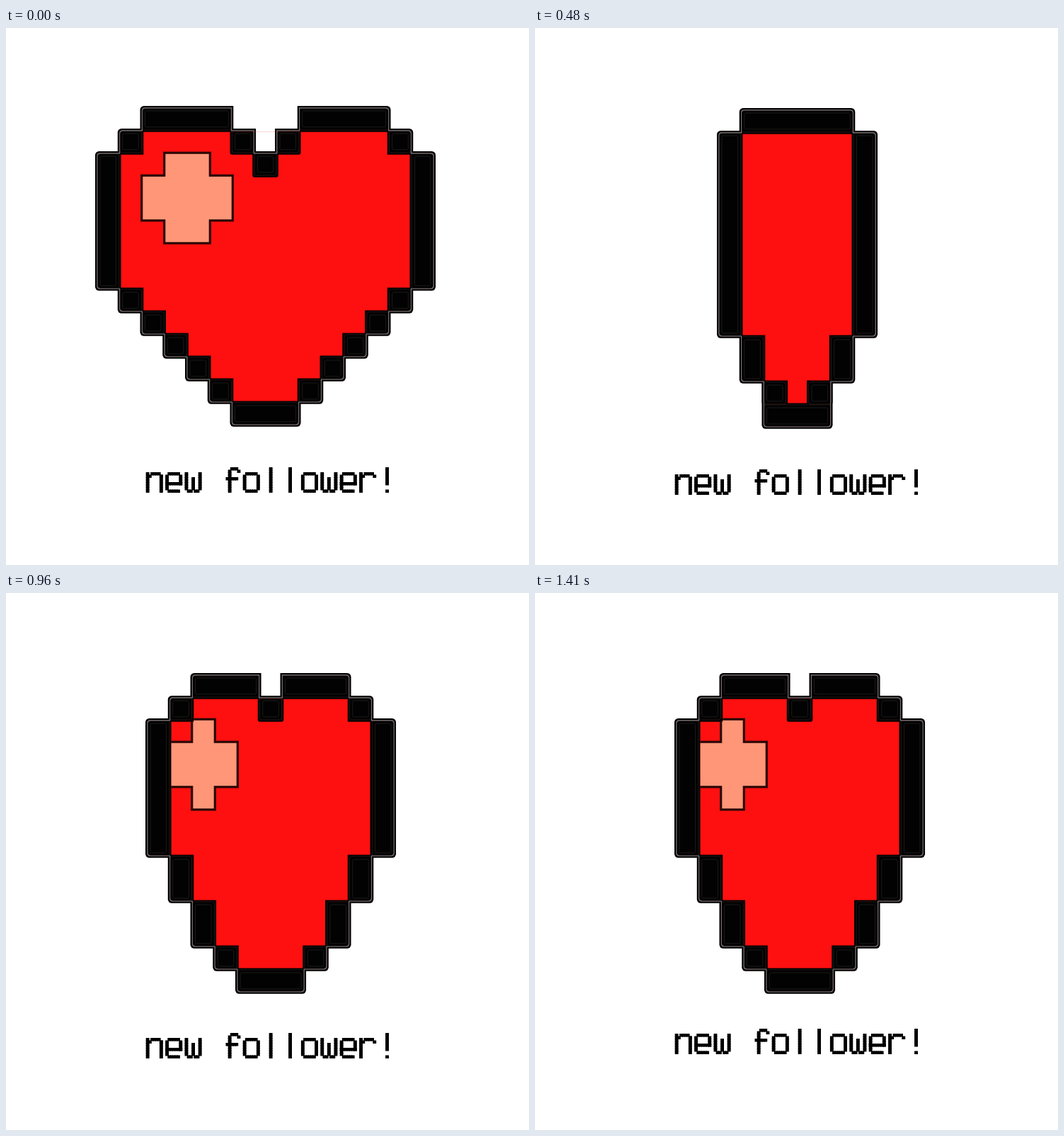
These frames come from a looping animation (739 px wide and 758 px high, 1.44 s). An HTML page with a canvas:

```html
<!DOCTYPE html>
<html lang="en">
<head>
<meta charset="utf-8">
<title>new follower!</title>
<style>
  html, body { margin: 0; width: 100%; height: 100%; overflow: hidden; background: #fff; }
  canvas { display: block; }
</style>
</head>
<body>
<canvas id="stage" width="739" height="758" role="img" aria-label="new follower!"></canvas>
<script>
const W = 739, H = 758, LOOP = 1440, TICK = 30, POSE_TIME = 120;
const PX = 31.75, PY = 32, LIP = 4.8; // cell pitch and overlap of neighbouring blocks
const BOTTOM_ROW = 13;
const ctx = document.getElementById('stage').getContext('2d');

// Builds the left half of a heart from cells; the right half is mirrored.
function makeHeart({ x, y, cols, shoulder, sideEnd, step, notch, patch }) {
  const mid = (cols - 1) / 2;
  const cell = (c, r, w = 1, h = 1) => ({ c, r, w, h });
  const lobe = notch ? mid - notch + 1 - shoulder : cols - 2 * shoulder;
  const rim = [cell(shoulder, 0, lobe), cell(0, shoulder, 1, sideEnd - shoulder),
               cell(mid - 1, BOTTOM_ROW, 3)];
  for (let i = 1; i < shoulder; i++) rim.push(cell(shoulder - i, i));
  for (let r = sideEnd, c = 1; r < BOTTOM_ROW; r += step, c++)
    rim.push(cell(c, r, 1, Math.min(step, BOTTOM_ROW - r)));

  const inner = [], gaps = [];
  for (let depth = notch; depth > 0; depth--) {
    const c = mid - depth + 1, r = notch - depth;
    gaps.push(cell(c, r, 2 * depth - 1));
    inner.push(cell(c, r + 1));
  }
  return { x, y, cols, rim, inner, gaps, patch };
}

const poses = [
  { x: 126, y: 110, cols: 15, shoulder: 2, sideEnd: 8, step: 1, notch: 2, patch: { x: 256, y: 240, arm: 32.5 } },
  { x: 257, y: 113, cols: 7, shoulder: 1, sideEnd: 10, step: 2, notch: 0 },
  { x: 197, y: 113, cols: 11, shoulder: 2, sideEnd: 8, step: 2, notch: 1, patch: { x: 279, y: 242, arm: 16.5 } }
];

function makeLayer(paint) {
  const layer = document.createElement('canvas');
  layer.width = W;
  layer.height = H;
  paint(layer.getContext('2d'));
  return layer;
}

function traceBox(g, [x, y, w, h], inset, radius) {
  g.beginPath();
  g.roundRect(x + inset, y + inset, w - 2 * inset, h - 2 * inset, radius);
}

function blockBox(heart, { c, r, w, h }) {
  return [heart.x + c * PX, heart.y + r * PY, w * PX + LIP, h * PY + LIP];
}

function gapBox(heart, { c, r, w, h }, grow) {
  return [heart.x + c * PX + LIP - grow, heart.y + r * PY - 6,
          w * PX - LIP + 2 * grow, h * PY + 6 + grow];
}

function bothSides(heart, blocks) {
  return blocks.flatMap(b => {
    const c = heart.cols - b.c - b.w;
    return c === b.c ? [b] : [b, { ...b, c }];
  });
}

function silhouette(heart, inset, color) {
  return makeLayer(g => {
    g.fillStyle = color;
    for (const { c, r, h } of heart.rim) {
      // Reach into the middle rows so that stacked spans merge.
      const top = Math.min(r, 5), bottom = Math.max(r + h, 6);
      const span = { c, r: top, w: heart.cols - 2 * c, h: bottom - top };
      traceBox(g, blockBox(heart, span), inset, 5.5 - inset / 2);
      g.fill();
    }
    g.globalCompositeOperation = 'destination-out';
    for (const gap of heart.gaps) g.fillRect(...gapBox(heart, gap, inset));
  });
}

function drawPatch(g, { x, y, arm }) {
  const reach = 32, armY = 32;
  const plus = grow => {
    g.fillRect(x - arm - grow, y - armY - reach - grow, 2 * (arm + grow), 2 * (armY + reach + grow));
    g.fillRect(x - arm - reach - grow, y - armY - grow, 2 * (arm + reach + grow), 2 * (armY + grow));
  };
  g.fillStyle = '#2b0806';
  plus(1.4);
  g.fillStyle = '#ff9678';
  plus(-1.8);
}

function redBody(heart) {
  return makeLayer(g => {
    g.beginPath();
    for (const { c, r, w, h } of heart.rim) {
      const left = (c + w) * PX + LIP, right = (heart.cols - c - w) * PX;
      if (r === 0 || right <= left) continue;
      const top = r * PY + (r < 3 ? LIP : 0);
      const bottom = (r + h) * PY + (r + h < 3 ? LIP + 1 : 0.5);
      g.rect(heart.x + left, heart.y + top, right - left, bottom - top);
    }
    g.fillStyle = '#ff1010';
    g.fill();
    g.clip();
    if (heart.patch) drawPatch(g, heart.patch);
    g.globalCompositeOperation = 'destination-out';
    for (const block of bothSides(heart, heart.inner)) {
      traceBox(g, blockBox(heart, block), 0, 3);
      g.fill();
    }
    for (const gap of heart.gaps) g.fillRect(...gapBox(heart, gap, 0));
  });
}

function renderHeart(heart) {
  return makeLayer(g => {
    g.drawImage(silhouette(heart, 0, '#000'), 0, 0);
    g.drawImage(silhouette(heart, 2.3, '#858585'), 0, 0);
    g.drawImage(silhouette(heart, 3.4, '#020202'), 0, 0);
    g.filter = 'blur(0.6px)';
    g.drawImage(redBody(heart), 0, 0);
    g.lineWidth = 1;
    for (const block of bothSides(heart, [...heart.rim, ...heart.inner])) {
      const box = blockBox(heart, block);
      g.strokeStyle = 'rgba(120,70,70,.3)';
      traceBox(g, box, 2.8, 3);
      g.stroke();
      g.strokeStyle = '#1b1b1b';
      traceBox(g, box, 7, 2);
      g.stroke();
    }
  });
}

// Letters are composed of dotted strokes on a grid: 7 columns, 10 rows.
const DOT_W = 4.9, DOT_H = 4.5, COL = 3.2, ROW = 3.5, ADVANCE = 27.4, TEXT_X = 197.7, TEXT_H = 36;
const LEFT = 0, MID = 3, RIGHT = 6, TOP = 0, X_TOP = 2, BAR = 6, BASE = 9;

function letterPen(g, x) {
  const dot = (c, r) => g.fillRect(x + c * COL, r * ROW, DOT_W, DOT_H);
  const stem = (c, from, to) => { for (let r = from; r <= to; r++) dot(c, r); };
  const bar = (r, from, to) => { for (let c = from; c <= to; c++) dot(c, r); };
  const shoulder = () => {
    stem(LEFT, X_TOP, BASE);
    dot(LEFT + 1, X_TOP + 1);
    bar(X_TOP, LEFT + 2, RIGHT - 1);
    dot(RIGHT, X_TOP + 1);
  };
  const bowl = rightEnd => {
    bar(X_TOP, LEFT + 1, RIGHT - 1);
    bar(BASE, LEFT + 1, RIGHT - 1);
    stem(LEFT, X_TOP + 1, BASE - 1);
    stem(RIGHT, X_TOP + 1, rightEnd);
  };
  return {
    n() { shoulder(); stem(RIGHT, X_TOP + 1, BASE); },
    r() { shoulder(); },
    o() { bowl(BASE - 1); },
    e() { bowl(BAR); bar(BAR, LEFT, RIGHT); },
    l() { stem(MID, TOP, BASE); },
    '!'() { stem(MID, TOP, BAR); dot(MID, BASE); },
    f() {
      stem(MID - 1, TOP + 1, BASE);
      bar(TOP, MID, RIGHT - 1);
      dot(RIGHT, TOP + 1);
      bar(X_TOP + 2, LEFT + 1, RIGHT - 1);
    },
    w() {
      stem(LEFT, X_TOP, BASE - 1);
      stem(RIGHT, X_TOP, BASE - 1);
      stem(MID, X_TOP + 2, BASE - 1);
      bar(BASE, LEFT + 1, MID - 1);
      bar(BASE, MID + 1, RIGHT - 1);
    },
    ' '() {}
  };
}

const label = makeLayer(g => {
  [...'new follower!'].forEach((ch, i) => letterPen(g, TEXT_X + i * ADVANCE)[ch]());
});

// Turning points of the label's bob: [tick, bottom edge]
const BOB = [[0, 656], [9, 652], [16, 658.5], [25, 652], [31, 657], [48, 651]];

function labelBottom(tick) {
  const i = BOB.findIndex(([t]) => t > tick);
  const [t0, y0] = BOB[i - 1], [t1, y1] = BOB[i];
  const ease = (1 - Math.cos(Math.PI * (tick - t0) / (t1 - t0))) / 2;
  return y0 + (y1 - y0) * ease;
}

const spin = poses.map(makeHeart).map(renderHeart);

function draw(now) {
  const time = now % LOOP;
  const tick = Math.floor(time / TICK);
  ctx.fillStyle = '#fff';
  ctx.fillRect(0, 0, W, H);
  ctx.drawImage(spin[Math.floor(time / POSE_TIME) % spin.length], 0, 0);
  ctx.drawImage(label, 0, Math.round(labelBottom(tick) - TEXT_H));
}

const start = performance.now();
function loop() {
  draw(performance.now() - start);
  requestAnimationFrame(loop);
}
loop();
</script>
</body>
</html>
```
